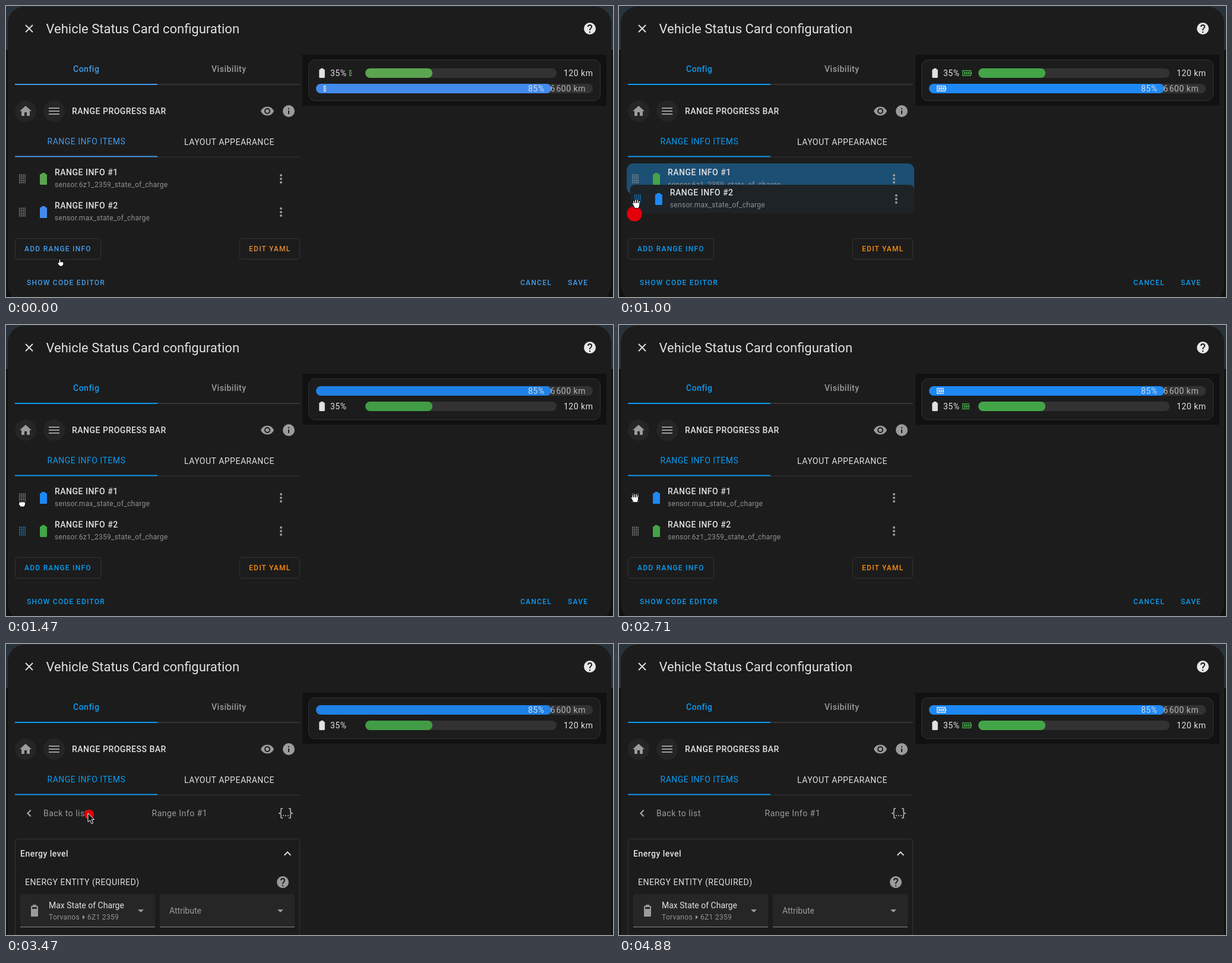
Write an HTML page that moves like this. It is 1022 by 490 pixels and loops after 6.24 s.

```html
<!DOCTYPE html>
<html lang="en">
<head>
<meta charset="utf-8">
<title>Card configuration</title>
<style>
  html, body { margin: 0; width: 100%; height: 100%; overflow: hidden; background: #111; }
  svg { display: block; width: 100vw; height: 100vh; --blue: #0a9cf2; --orange: #fb8c0b; --level: #1e88f5; --green: #43a547; }
  svg.muted { --blue: #429ce9; --orange: #e68d30; --level: #428bec; --green: #5ba450; }
  text { font: 14px Roboto, sans-serif; letter-spacing: .5px; fill: #e1e1e1; white-space: pre; }
  .title { font-size: 22px; letter-spacing: 0; }
  .medium { font-weight: 500; }
  .plain { letter-spacing: 0; }
  .small { font-size: 12px; letter-spacing: .3px; fill: #919191; }
  .button { font-size: 12px; font-weight: 500; letter-spacing: 1.25px; fill: var(--blue); }
  .grey { fill: #9b9b9b; }
  .blue { fill: var(--blue); }
  .orange { fill: var(--orange); }
  .level { fill: var(--level); }
  .green { fill: var(--green); }
  .line { fill: none; stroke: #343434; }
</style>
</head>
<body>
<svg id="stage" viewBox="0 0 1022 490" preserveAspectRatio="none"></svg>
<script>
const LOOP = 6240;
const PRESS = 770, SWAP = 1000, DROP = 1290, CLICK = 3120, OPEN = 3200, HOVER = 4190, LEAVE = 4580;

const ICONS = {
  help: 'M15.07 11.25L14.17 12.17C13.45 12.89 13 13.5 13 15H11V14.5C11 13.39 11.45 12.39 12.17 11.67L13.41 10.41C13.78 10.05 14 9.55 14 9C14 7.89 13.1 7 12 7A2 2 0 0 0 10 9H8A4 4 0 0 1 16 9C16 9.88 15.64 10.67 15.07 11.25M13 19H11V17H13M12 2A10 10 0 0 0 12 22A10 10 0 0 0 12 2Z',
  home: 'M10 20V14H14V20H19V12H22L12 3L2 12H5V20H10Z',
  menu: 'M3 6H21V8H3ZM3 11H21V13H3ZM3 16H21V18H3Z',
  eye: 'M12 9A3 3 0 0 0 12 15A3 3 0 0 0 12 9M12 17A5 5 0 0 1 12 7A5 5 0 0 1 12 17M12 4.5C7 4.5 2.73 7.61 1 12C2.73 16.39 7 19.5 12 19.5C17 19.5 21.27 16.39 23 12C21.27 7.61 17 4.5 12 4.5Z',
  info: 'M13 9H11V7H13M13 17H11V11H13M12 2A10 10 0 0 0 12 22A10 10 0 0 0 12 2Z',
  battery: 'M16.67 4H15V2H9V4H7.33A1.33 1.33 0 0 0 6 5.33V20.67C6 21.4 6.6 22 7.33 22H16.67A1.33 1.33 0 0 0 18 20.67V5.33C18 4.6 17.4 4 16.67 4Z',
  back: 'M15.41 16.58L10.83 12L15.41 7.41L14 6L8 12L14 18Z',
  up: 'M7.41 15.41L12 10.83L16.59 15.41L18 14L12 8L6 14Z',
  down: 'M7 10L12 15L17 10Z',
  dots: 'M12 4A2 2 0 0 0 12 8A2 2 0 0 0 12 4M12 10A2 2 0 0 0 12 14A2 2 0 0 0 12 10M12 16A2 2 0 0 0 12 20A2 2 0 0 0 12 16',
  json: 'M5 3H7V5H5V10A2 2 0 0 1 3 12A2 2 0 0 1 5 14V19H7V21H5C3.93 20.73 3 20.1 3 19V15A2 2 0 0 0 1 13H0V11H1A2 2 0 0 0 3 9V5A2 2 0 0 1 5 3M19 3A2 2 0 0 1 21 5V9A2 2 0 0 0 23 11H24V13H23A2 2 0 0 0 21 15V19A2 2 0 0 1 19 21H17V19H19V14A2 2 0 0 1 21 12A2 2 0 0 1 19 10V5H17V3H19M11 15H13V17H11ZM7 15H9V17H7ZM15 15H17V17H15Z'
};

const text = (x, y, content, cls = '', id = '') =>
  `<text x="${x}" y="${y}" class="${cls}" id="${id}">${content}</text>`;
const rect = (x, y, w, h, fill, r = 0, extra = '') =>
  `<rect x="${x}" y="${y}" width="${w}" height="${h}" rx="${r}" fill="${fill}" ${extra}/>`;
const outline = (x, y, w, h, r) => rect(x, y, w, h, 'none', r, 'class="line"');
const icon = (name, cx, cy, fill = '#9b9b9b', size = 24) =>
  `<path d="${ICONS[name]}" fill="${fill}" fill-rule="evenodd" transform="translate(${cx} ${cy}) scale(${size / 24}) translate(-12 -12)"/>`;

// Drag handle: five dotted strokes, four dots each
const handle = id => `<path id="${id}" d="${[-6.4, -3.2, 0, 3.2, 6.4].map(y => `M22 ${y}H33`).join('')}"
  stroke-width="1.7" stroke-dasharray="1.7 1.4" stroke="#9b9b9b"/>`;

const row = (id, color, sensor) => `<g id="row${id}">
  ${id === 'B' ? rect(15, -24, 480, 48, '#1d2327', 8, 'id="lift"') : ''}
  ${handle('handle' + id)}${icon('battery', 63, 0, `var(--${color})`)}
  ${text(82, -6, '', 'medium', 'label' + id)}${text(82, 14, sensor, 'small')}
  ${icon('dots', 463, 0)}</g>`;

const charge = (x, color) => `<g clip-path="url(#reveal)" transform="translate(${x} -5)" style="fill:${color}">
  <path fill-rule="evenodd" d="M0 0H15V3H16V7H15V10H0ZM1.5 1.5V8.5H13.5V1.5Z"/>
  <path d="M3 2.8H5.4V7.2H3ZM6.4 2.8H8.8V7.2H6.4ZM9.8 2.8H12.2V7.2H9.8Z"/></g>`;

const field = (x, id) => rect(x, 421, 227, 55, '#262626', 3, `id="${id}"`) + rect(x, 476, 227, 1, '#8b8b8b');

const HANDS = {
  point: 'M-1.5 1V-4.5M-1.5 0H3.5V3L2 5H-1L-4 1.5L-2.5 1Z',
  open: 'M-3.5 1L-4.5 -4M-1 0L-1.5 -6M2 0V-6M4 1L5 -4M-6 0L-3.5 3M-4 0H4.5L4 4L3 6.5H-2L-4 3Z',
  closed: 'M-3 0V-1.5M-.5 0V-2M2 0V-2M4 1V-1M-4 0H4.5L4 3L3 5H-2L-4.5 1.5Z'
};
const hand = kind => `<g id="${kind}" stroke-linecap="round" stroke-linejoin="round" fill="#fff">
  <path d="${HANDS[kind]}" stroke="#000" stroke-width="3.4"/>
  <path d="${HANDS[kind]}" stroke="#fff" stroke-width="1.5"/></g>`;

const dialog = `
  ${rect(0, 0, 1022, 74, '#28323a')}
  ${rect(3, 1, 1016, 497, '#1c1c1c', 28, 'id="dialog"')}
  <path d="M33 32L45 44M45 32L33 44" stroke="#e1e1e1" stroke-width="1.9"/>
  ${text(67.5, 45.5, 'Vehicle Status Card configuration', 'title')}
  ${icon('help', 983, 38, '#e8e8e8')}
  ${text(113, 111, 'Config', 'medium blue')}
  ${text(346, 111, 'Visibility', 'medium grey')}
  ${rect(15, 131, 480, 2, '#343434')}
  <rect x="15" y="131" width="240" height="2" class="blue"/>
  <circle cx="33" cy="177" r="18" fill="#252525"/><circle cx="81" cy="177" r="18" fill="#252525"/>
  ${icon('home', 33, 177)}${icon('menu', 81, 177)}
  ${text(111, 182, 'RANGE PROGRESS BAR', 'medium')}
  ${icon('eye', 440, 177)}${icon('info', 476, 177)}
  ${text(69.5, 233, 'RANGE INFO ITEMS', 'blue')}
  ${text(300, 234, 'LAYOUT APPEARANCE')}
  ${rect(15, 254, 480, 1, '#343434')}
  <rect x="15" y="252.5" width="240" height="1.8" class="blue"/>`;

const preview = `
  ${rect(499, 82, 512, 86, '#111')}
  ${rect(509.5, 90.5, 491, 69, '#1c1c1c', 11, 'stroke="#333"')}
  <g id="greenBar">
    ${icon('battery', 532, 0, '#e1e1e1', 19)}${text(546, 5, '35%')}${charge(578, 'var(--green)')}
    ${rect(605, -8, 322, 16, '#323232', 8)}
    <rect x="605" y="-8" width="113" height="16" rx="8" class="green pulse"/>
    ${text(939, 5, '120 km')}
  </g>
  <g id="blueBar">
    ${rect(522, -8, 466, 16, '#323232', 8)}
    <rect x="522" y="-8" width="396" height="16" rx="8" class="level pulse"/>
    ${charge(535, '#dbe7f7')}
    <text x="879" y="5" style="fill:#cfdcec">85%</text>
    <g style="opacity:.75">${text(916.5, 5, '6')}${text(926.5, 5, '600 km')}</g>
  </g>`;

const list = `<g id="list">
  <rect id="slot" x="13" y="-26" width="484" height="52" rx="11" fill="#1c4f74"/>
  ${row('A', 'green', 'sensor.6z1_2359_state_of_charge')}
  ${row('B', 'level', 'sensor.max_state_of_charge')}
  ${outline(15.5, 391.5, 144, 35, 4)}${text(31, 413, 'ADD RANGE INFO', 'button')}
  ${outline(393.5, 391.5, 101, 35, 4)}${text(409, 413, 'EDIT YAML', 'button orange')}
  ${text(35, 470, 'SHOW CODE EDITOR', 'button')}
  ${text(866, 470, 'CANCEL', 'button')}${text(946, 470, 'SAVE', 'button')}</g>`;

const editor = `<g id="editor">
  ${icon('back', 39, 285, '#b0b0b0')}
  ${text(63, 290, 'Back to list', 'grey')}${text(245.5, 290, 'Range Info #1', 'grey')}
  ${icon('json', 471, 285)}
  ${outline(15.5, 328.5, 479, 200, 5)}
  ${text(24, 358, 'Energy level', 'medium')}${icon('up', 474, 353, '#e1e1e1')}
  ${text(32, 406, 'ENERGY ENTITY (REQUIRED)')}${icon('help', 466, 401)}
  ${field(24, 'entity')}${field(259, 'attribute')}
  ${icon('battery', 48, 449)}${rect(44, 443, 8, 3, '#262626')}
  ${text(72, 445, 'Max State of Charge', 'plain')}
  <g style="letter-spacing:0">${text(72, 464, 'Torvanos', 'small plain')}${text(137, 464, '6Z1 2359', 'small plain')}</g>
  <path d="M129 456.5L133 460L129 463.5Z" fill="#9b9b9b"/>
  ${icon('down', 227, 449)}
  ${text(275, 454, 'Attribute', 'plain grey')}${icon('down', 462, 449)}</g>`;

const stage = document.getElementById('stage');
stage.innerHTML = `<clipPath id="reveal"><rect id="revealBox" height="10"/></clipPath>
  ${dialog}${preview}${list}${editor}
  <circle id="ripple" fill="#e3000b"/>
  <g id="cursor">${Object.keys(HANDS).map(hand).join('')}
    <path id="arrow" d="M0 0V14.5L3.4 11.5L6 17.5L8.6 16.4L6 10.6H10.5Z" fill="#000" stroke="#fff"/></g>`;

const $ = id => document.getElementById(id);
const pulses = document.querySelectorAll('.pulse');
const show = (id, on) => { $(id).style.display = on ? '' : 'none'; };
const move = (id, x, y) => $(id).setAttribute('transform', `translate(${x} ${y})`);
const clamp = v => Math.min(1, Math.max(0, v));
const smooth = v => v * v * (3 - 2 * v);

// time, x, y, shape
const CURSOR = [
  [0, 92, 432, 'point'], [60, 92, 432, 'point'], [470, 62, 402, 'point'], [710, 62, 402, 'arrow'],
  [770, 27, 349, 'arrow'], [820, 31, 343, 'arrow'], [880, 30, 345, 'open'], [1240, 27, 298, 'open'],
  [1290, 27, 300, 'closed'], [2470, 27, 300, 'open'], [2650, 27, 291, 'open'], [2880, 27, 291, 'arrow'],
  [3080, 138, 285, 'arrow'], [3530, 138, 285, 'arrow'], [4120, 300, 378, 'arrow'],
  [4180, 305, 388, 'arrow'], [4580, 330, 495, 'arrow'], [LOOP, 330, 495, 'arrow']
];
// time, x, y of the dragged row against its first place
const DRAG = [[PRESS, 0, 0], [820, 5, -3], [1240, 2, -51], [DROP, 2, -51]];

function along(steps, t) {
  let i = 0;
  while (i < steps.length - 2 && t >= steps[i + 1][0]) i++;
  const [t0, x0, y0, kind] = steps[i], [t1, x1, y1] = steps[i + 1];
  const k = smooth(clamp((t - t0) / (t1 - t0)));
  return { x: x0 + (x1 - x0) * k, y: y0 + (y1 - y0) * k, kind };
}

function drawCharge(t) {
  const phase = (Math.min(t, 4900) - 1270 + 2000) % 2000;
  $('revealBox').setAttribute('width', 4 * Math.floor(phase / 400));
  const dim = clamp(phase / 80) * clamp((700 - phase) / 400);
  pulses.forEach(bar => { bar.style.opacity = 1 - .08 * dim; });
}

function drawList(t) {
  const dragging = t >= PRESS && t < DROP, dropped = t >= DROP;
  const drag = along(DRAG, t);
  const shift = smooth(clamp((t - SWAP) / 150));
  show('slot', dragging);
  show('lift', dragging);
  move('slot', 0, t < SWAP ? 347 : 291);
  move('rowA', 0, 291 + 56 * shift);
  if (dragging) move('rowB', drag.x, 347 + drag.y);
  else move('rowB', 0, dropped ? 291 : 347);
  $('lift').setAttribute('width', Math.min(480, 482 - drag.x));
  $('labelA').textContent = `RANGE INFO #${dropped ? 2 : 1}`;
  $('labelB').textContent = `RANGE INFO #${dropped ? 1 : 2}`;
  $('handleA').style.stroke = t >= 1410 && t < 2150 ? 'var(--blue)' : '';
  $('handleB').style.stroke = dragging ? 'var(--blue)' : '';
  move('greenBar', 0, dropped ? 137 : 113);
  move('blueBar', 0, dropped ? 111 : 139);
}

function drawRipple(t) {
  const second = t >= CLICK, age = t - (second ? CLICK : PRESS);
  const r = age < 0 ? 0 : Math.max(0, 22 - age * .04);
  $('ripple').setAttribute('r', r);
  move('ripple', second ? 140 : 26, second ? 287 : 350);
}

function drawCursor(t) {
  const { x, y, kind } = along(CURSOR, t);
  move('cursor', x, y);
  ['point', 'open', 'closed', 'arrow'].forEach(name => show(name, name === kind));
}

function render(t) {
  stage.classList.toggle('muted', t < 60);
  const opened = t >= OPEN;
  show('list', !opened);
  show('editor', opened);
  $('dialog').setAttribute('height', opened ? 560 : 497);
  $('attribute').style.fill = t >= HOVER && t < LEAVE ? '#2e2e2e' : '';
  drawCharge(t);
  drawList(t);
  drawRipple(t);
  drawCursor(t);
}

const start = performance.now();
function tick() {
  render((performance.now() - start) % LOOP);
  requestAnimationFrame(tick);
}
tick();
</script>
</body>
</html>
```
